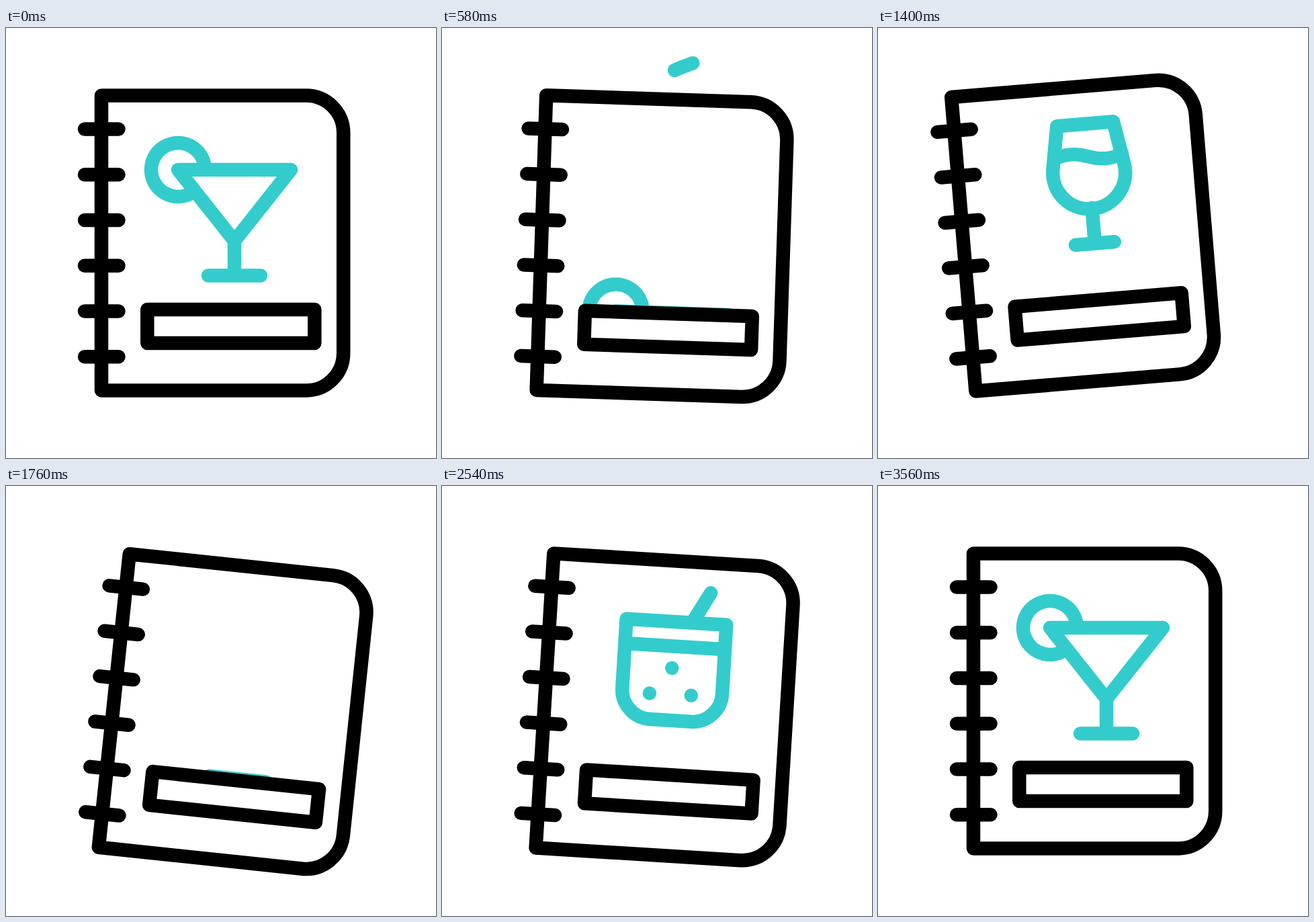
An HTML page that plays this animation: 640x640 px, repeating every 3580 ms.

```html
<!DOCTYPE html>
<html lang="en">
<head>
<meta charset="utf-8">
<title>Drinks menu</title>
<style>
  html, body { margin: 0; width: 100%; height: 100%; overflow: hidden; background: #fff; }
  svg { display: block; width: 100vw; height: 100vh; }
  path, rect { fill: none; stroke-width: 20.5; stroke-linecap: round; stroke-linejoin: round; }
  .ink { stroke: #000; }
  .drink path, .swoosh { stroke: #3cc; }
  .drink circle { fill: #3cc; }
</style>
</head>
<body>
<svg viewBox="0 0 640 640">
  <clipPath id="page"><rect y="-100" width="640" height="519"/></clipPath>
  <g id="book">
    <g clip-path="url(#page)">
      <g class="drink" data-enter="2950" data-leave="295">
        <path d="M296 211A40 40 0 1 0 280 243" style="stroke-linecap:butt"/>
        <path d="M256 211H424L340 317ZM340 317V368.5M301 368.5H379"/>
      </g>
      <g class="drink" data-enter="720" data-leave="1405">
        <path d="M295 156.5H379L390 219A54 54 0 1 1 284 219Z"/>
        <path d="M287 205C305 198 320 199 337 205S370 213 388 205M337 282V335M308 335H366"/>
      </g>
      <g class="drink" data-enter="1781" data-leave="2540">
        <path d="M256 191H405V294A44 44 0 0 1 361 338H300A44 44 0 0 1 256 294ZM256 227.5H405M379 145L356 187"/>
        <circle cx="328" cy="260" r="10.3"/>
        <circle cx="297" cy="299.5" r="10.3"/>
        <circle cx="359" cy="299" r="10.3"/>
      </g>
    </g>
    <path class="ink" d="M142 100.5H447A55.5 55.5 0 0 1 502.2 156V484A55.5 55.5 0 0 1 447 539.5H142Z"/>
    <path class="ink" id="rings"/>
    <rect class="ink" x="210.3" y="419" width="249" height="50"/>
  </g>
  <path class="swoosh" pathLength="100" data-start="545" data-span="190" d="M346 63C490 0 589 60 589 190"/>
  <path class="swoosh" pathLength="100" data-start="1930" data-span="235" d="M584 182A136 136 0 0 0 352 65"/>
  <path class="swoosh" pathLength="100" data-start="3415" data-span="70" d="M306 176Q360 142 429 127"/>
</svg>
<script>
const LOOP = 3580, SLIDE = 440, DEPTH = 285, TILT = 6;
const SWING_START = 180, SWING_END = 3066;
const turns = [295, 770, 1306, 1756, 2206, 2686];

const book = document.getElementById('book');
const drinks = document.querySelectorAll('.drink');
const swooshes = document.querySelectorAll('.swoosh');

const wrap = t => (t + LOOP) % LOOP;
const ramp = (t, from, span) => {
  const u = Math.min(1, Math.max(0, (t - from) / span));
  return (1 - Math.cos(Math.PI * u)) / 2;
};

// The book rocks left and right, easing between its turning points
function tilt(t) {
  const times = [SWING_START, ...turns, SWING_END];
  const angle = i => i === 0 || i > turns.length ? 0 : i % 2 ? -TILT : TILT;
  return times.slice(1).reduce((sum, time, i) =>
    sum + (angle(i + 1) - angle(i)) * ramp(t, times[i], time - times[i]), 0);
}

// Each drink rises from behind the label, stays, then sinks back
function placeDrink(drink, t) {
  const { enter, leave } = drink.dataset;
  const age = wrap(t - enter);
  const sunk = 1 - ramp(age, 0, SLIDE) + ramp(age, wrap(leave - enter), SLIDE);
  drink.setAttribute('transform', `translate(0 ${DEPTH * sunk})`);
}

// A stroke draws itself on, then its tail catches up
function drawSwoosh(path, t) {
  const start = +path.dataset.start, span = +path.dataset.span;
  const tail = 100 * ramp(t, start + span, span);
  const length = 100 * ramp(t, start, span) - tail;
  path.style.display = length > 0.1 ? '' : 'none';
  path.setAttribute('stroke-dasharray', `${length} 300`);
  path.setAttribute('stroke-dashoffset', -tail);
}

document.getElementById('rings').setAttribute('d',
  Array.from({ length: 6 }, (_, i) => `M117 ${150.5 + i * 67.75}H167.5`).join(''));

const start = performance.now();
function tick() {
  const t = (performance.now() - start) % LOOP;
  book.setAttribute('transform', `rotate(${tilt(t)} 156 499)`);
  drinks.forEach(drink => placeDrink(drink, t));
  swooshes.forEach(path => drawSwoosh(path, t));
  requestAnimationFrame(tick);
}
tick();
</script>
</body>
</html>
```
